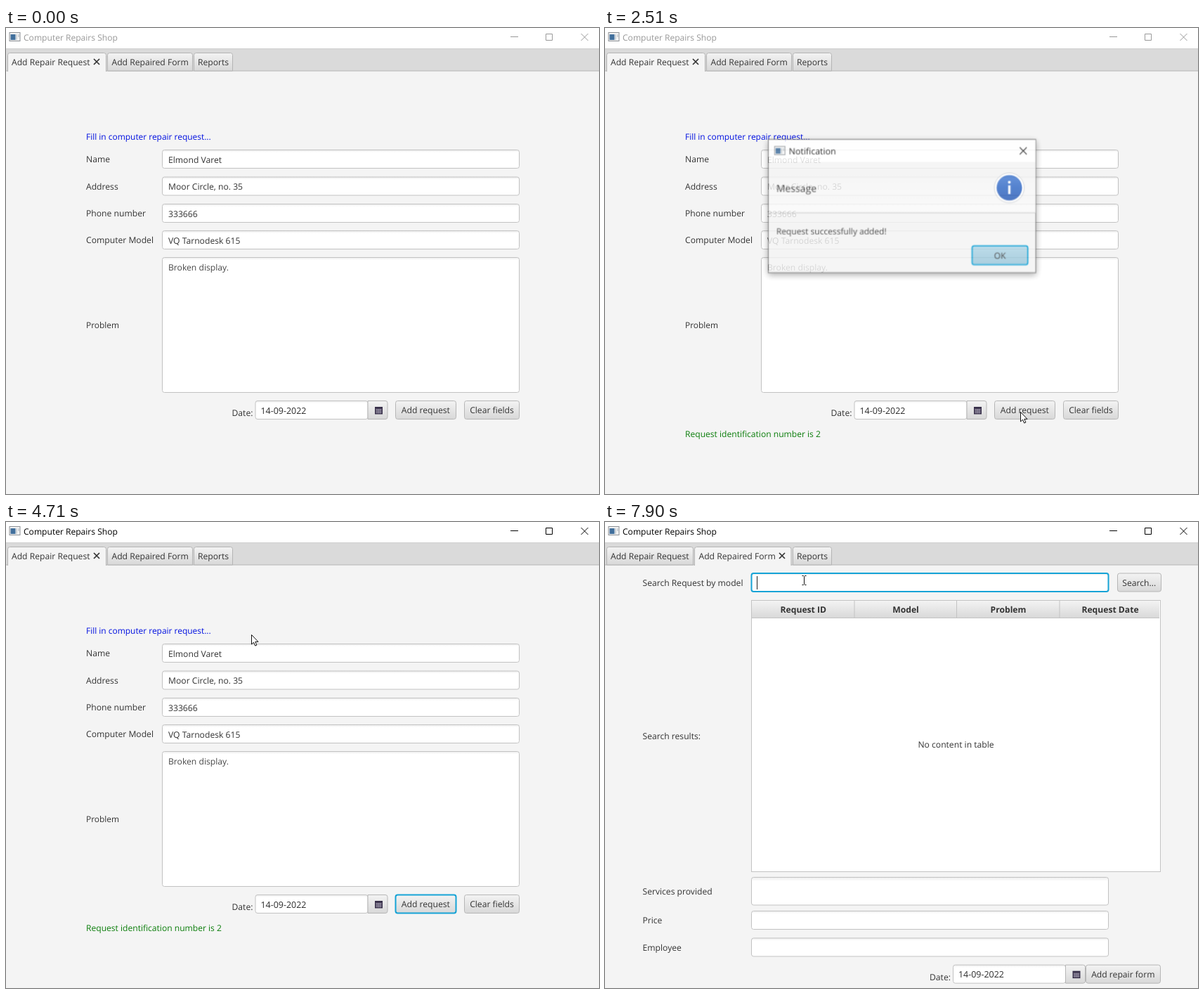
Recreate the animation shown at these times as an HTML page. Size 844 by 663 pixels, loop 8000 ms.

```html
<!DOCTYPE html>
<html lang="en">
<head>
<meta charset="utf-8">
<title>Computer Repairs Shop</title>
<style>
html, body { margin: 0; width: 100%; height: 100%; overflow: hidden; background: #f4f4f4; }
svg { display: block; width: 100vw; height: 100vh; }
text { font: 12.15px "Open Sans", "Noto Sans", sans-serif; fill: #333; text-rendering: geometricPrecision; white-space: pre; }
.mid { text-anchor: middle; }
.bold { font-weight: 700; }
.value { fill: #2b2b2b; }
.date { font-size: 12.45px; }
.input, .area { fill: url(#inset); stroke: #c2c2c2; rx: 3px; }
.area { fill: url(#insetTall); }
.button { fill: url(#raised); stroke: #b6b6b6; rx: 3px; }
.tab { fill: url(#raised); stroke: #b4b4b4; }
.open { fill: #f4f4f4; stroke: #b4b4b4; }
.ring { fill: none; stroke: #16a3d6; stroke-width: 2; rx: 3px; }
.cross { fill: none; stroke: #333; stroke-width: 1.7; }
.thin { fill: none; stroke: currentColor; }
.light { fill: #fff; fill-opacity: .38; rx: 3px; }
.dark { fill: #000; fill-opacity: .08; rx: 3px; }

/* 1% = 80 ms */
.step { animation: 8s step-end infinite; }
.active { color: #999; animation-name: active; }
.active text { fill: currentColor; font-size: 12.07px; }
.page1 { animation-name: page1; }
.page2 { animation-name: page2; }
.addHover { animation-name: addHover; }
.addPress { animation-name: addPress; }
.addFocus { animation-name: addFocus; }
.message { animation-name: message; }
.okHover { animation-name: okHover; }
.okPress { animation-name: okPress; }
.tabHover { animation-name: tabHover; }
.tabFocus { animation-name: tabFocus; }
.fieldFocus { animation-name: fieldFocus; }
.caret { animation-name: caret; }
.shown { animation-name: shown; }
.spot { animation-name: spot; }
.arrow { animation-name: arrow; }
.beam { animation-name: beam; }
.dialog { transform-origin: 423px 253px; animation: dialog 8s linear infinite; }
.frame { filter: drop-shadow(0 3px 5px rgba(0,0,0,.38)); }
.pointer { animation: move 8s linear infinite; }

@keyframes active { 0%, 30% { color: #999; } 25.5%, 48.75% { color: #000; } }
@keyframes page1 { 0% { opacity: 1; } 72.25% { opacity: 0; } }
@keyframes page2 { 0% { opacity: 0; } 72.25% { opacity: 1; } }
@keyframes addHover { 0%, 25.5%, 30% { opacity: 0; } 15.4%, 27.625% { opacity: 1; } }
@keyframes addPress { 0%, 27.625% { opacity: 0; } 25.5% { opacity: 1; } }
@keyframes addFocus { 0%, 30% { opacity: 0; } 25.5%, 48.75% { opacity: 1; } }
@keyframes message { 0% { opacity: 0; } 28.25% { opacity: 1; } }
@keyframes okHover { 0%, 46.875% { opacity: 0; } 39.8% { opacity: 1; } }
@keyframes okPress { 0%, 48.75% { opacity: 0; } 46.875% { opacity: 1; } }
@keyframes tabHover { 0% { opacity: 0; } 63% { opacity: 1; } }
@keyframes tabFocus { 0% { opacity: 1; } 84.875% { opacity: 0; } }
@keyframes fieldFocus { 0% { opacity: 0; } 84.875% { opacity: 1; } }
@keyframes caret { 0%, 92.375% { opacity: 0; } 84.875%, 98.75% { opacity: 1; } }
@keyframes shown { 0% { opacity: 0; } 7.875% { opacity: 1; } }
@keyframes spot {
  0%, 27.625%, 48.75%, 74%, 86% { opacity: 0; }
  25.5%, 46.875%, 71.625%, 84.875% { opacity: 1; }
}
@keyframes arrow { 0% { opacity: 1; } 80.6% { opacity: 0; } }
@keyframes beam { 0% { opacity: 0; } 80.6% { opacity: 1; } }
@keyframes dialog {
  0%, 30% { opacity: 0; transform: scale(.96); }
  31.375%, 32.2% { opacity: .84; transform: scale(.99); }
  32.25%, 48.74% { opacity: 1; transform: none; }
  48.75%, 100% { opacity: 0; transform: none; }
}
@keyframes move {
  0%, 7.875% { transform: translate(776px, 655px); }
  10.5% { transform: translate(712px, 566px); }
  13.1% { transform: translate(640px, 513px); }
  15.6% { transform: translate(598px, 536px); }
  17.5%, 32.5% { transform: translate(591px, 546px); }
  35% { transform: translate(610px, 440px); }
  37.25% { transform: translate(617px, 358px); }
  39.8% { transform: translate(592px, 334px); }
  42%, 51% { transform: translate(569px, 321px); }
  53.4% { transform: translate(640px, 406px); }
  55.2% { transform: translate(560px, 345px); }
  58.875%, 59.4% { transform: translate(349px, 160px); }
  61.375% { transform: translate(278px, 83px); }
  63.5%, 65.6% { transform: translate(186px, 37px); }
  67.25%, 76.2% { transform: translate(196px, 47px); }
  79% { transform: translate(246px, 64px); }
  81.75%, 100% { transform: translate(283px, 83px); }
}
</style>
</head>
<body>
<svg viewBox="0 0 844 663" preserveAspectRatio="none">
  <defs>
    <linearGradient id="raised" x2="0" y2="1"><stop stop-color="#f3f3f3"/><stop offset="1" stop-color="#d8d8d8"/></linearGradient>
    <linearGradient id="blue" x2="0" y2="1"><stop stop-color="#b3d8e8"/><stop offset="1" stop-color="#9cc7da"/></linearGradient>
    <linearGradient id="inset" x2="0" y2="1"><stop stop-color="#ececec"/><stop offset=".14" stop-color="#fff"/></linearGradient>
    <linearGradient id="insetTall" x2="0" y2="1"><stop stop-color="#ececec"/><stop offset=".02" stop-color="#fff"/></linearGradient>
    <linearGradient id="head" x2="0" y2="1"><stop stop-color="#f3f3f3"/><stop offset="1" stop-color="#fafafa"/></linearGradient>
    <linearGradient id="info" x2="0" y2="1"><stop stop-color="#4c80d4"/><stop offset=".5" stop-color="#356bc6"/><stop offset="1" stop-color="#2f60b8"/></linearGradient>
    <g id="icon">
      <rect x=".5" y=".5" width="15" height="12" fill="#f4f4f4" stroke="#8b8f94"/>
      <rect x="2" y="3" width="7" height="8" fill="#416f9c"/>
      <path d="M10.5 3v8M13.5 3v4" stroke="#a9b4be"/>
    </g>
    <path id="x" class="cross" d="M-4-4 4 4M4-4-4 4"/>
    <g id="calendar">
      <path fill="#38304a" d="M0 0h11v10.5H0z"/>
      <path stroke="#b9b4c4" stroke-width=".7" d="M1 3.5h9M1 5.7h9M1 7.9h9M3.2 3v6.5M5.5 3v6.5M7.8 3v6.5"/>
    </g>
    <g id="picker">
      <rect class="input" x=".5" y=".5" width="160" height="26"/>
      <path d="M160.5.5h25a3 3 0 0 1 3 3v20a3 3 0 0 1-3 3h-25z" fill="url(#raised)" stroke="#b6b6b6"/>
      <use href="#calendar" x="170.5" y="9"/>
      <text class="value date" x="8" y="18.7">14-09-2022</text>
    </g>
    <g id="field"><rect class="input" x=".5" y=".5" width="508" height="26"/></g>
  </defs>

  <rect width="844" height="663" fill="#f4f4f4"/>
  <rect width="844" height="29" fill="#fff"/>
  <rect y="29" width="844" height="32" fill="#dadada"/>
  <path d="M0 29.5h844" stroke="#cfcfcf"/>
  <path d="M0 61h844" stroke="#b4b4b4"/>
  <use href="#icon" x="4.5" y="6"/>
  <g class="step active">
    <text x="25" y="18">Computer Repairs Shop</text>
    <path class="thin" d="M718 12.5h11M768.5 8.5h9v9h-9zM818.5 8l10 10M828.5 8l-10 10"/>
  </g>

  <g class="step page1">
    <path class="open" d="M2.5 62V38.500q0-3 3-3h134q3 0 3 3V62"/>
    <path class="tab" d="M144.500 61V38.500q0-3 3-3h115q3 0 3 3V61z"/>
    <rect class="step tabHover light" x="146" y="37" width="119" height="23"/>
    <text x="8" y="52.700">Add Repair Request</text>
    <use href="#x" x="129" y="48"/>
    <text x="150.500" y="52.700">Add Repaired Form</text>

    <text x="114" y="158.500" style="fill:#0010e0;font-size:11.95px">Fill in computer repair request...</text>
    <text x="114" y="191">Name</text>
    <text x="114" y="229.500">Address</text>
    <text x="114" y="267.700">Phone number</text>
    <text x="114" y="306">Computer Model</text>
    <text x="114" y="427" style="font-size:11.9px">Problem</text>
    <use href="#field" x="222" y="173"/>
    <use href="#field" x="222" y="211.500"/>
    <use href="#field" x="222" y="250"/>
    <use href="#field" x="222" y="288"/>
    <rect class="area" x="222.500" y="326.500" width="508" height="192"/>
    <g class="value">
      <text x="231" y="192">Elmond Varet</text>
      <text x="231" y="230.300">Moor Circle, no. 35</text>
      <text x="231" y="268.700">333666</text>
      <text x="231" y="307">VQ Tarnodesk 615</text>
      <text x="231" y="344.500" style="fill:#484848">Broken display.</text>
    </g>

    <text x="321.500" y="552">Date:</text>
    <use href="#picker" x="354.500" y="530"/>
    <rect class="button" x="554.500" y="530.500" width="86" height="26"/>
    <rect class="step addHover light" x="555" y="531" width="85" height="25"/>
    <rect class="step addPress dark" x="555" y="531" width="85" height="25"/>
    <rect class="step addFocus ring" x="554.500" y="530.500" width="86" height="26"/>
    <text class="mid" x="597.300" y="548.300">Add request</text>
    <rect class="button" x="652.500" y="530.500" width="78" height="26"/>
    <text class="mid" x="691.500" y="548.300">Clear fields</text>
    <text class="step message" x="114" y="582" style="fill:#0a7d0a;font-size:12.08px">Request identification number is 2</text>
  </g>

  <g class="step page2">
    <path class="tab" d="M2.500 61V38.500q0-3 3-3h117q3 0 3 3V61z"/>
    <path class="open" d="M127.500 62V38.500q0-3 3-3h131.500q3 0 3 3V62"/>
    <path class="step tabFocus ring" d="M128 61V38.500q0-2.500 2.500-2.500h132q2.500 0 2.500 2.500V61"/>
    <text x="8" y="52.700">Add Repair Request</text>
    <text x="133.500" y="52.700">Add Repaired Form</text>
    <use href="#x" x="252" y="48"/>

    <text x="53.500" y="90.500">Search Request by model</text>
    <text x="53.500" y="308.500">Search results:</text>
    <text x="53.500" y="530">Services provided</text>
    <text x="53.500" y="571">Price</text>
    <text x="53.500" y="609.500">Employee</text>
    <use href="#field" x="208" y="72.500"/>
    <rect class="step fieldFocus ring" x="208.500" y="73" width="508" height="26"/>
    <path class="step caret" d="M216.500 77v19" stroke="#222"/>
    <rect class="button" x="729.500" y="73" width="62" height="26"/>
    <text class="mid" x="760.300" y="90.500">Search...</text>

    <rect x="208.500" y="111.500" width="582" height="386" fill="#fff" stroke="#c3c3c3"/>
    <rect x="209" y="112" width="580" height="25" fill="url(#raised)"/>
    <path d="M209 136.500h580M355 112v25M500.500 112v25M647 112v25" stroke="#c3c3c3"/>
    <g class="bold">
      <text class="mid bold" x="282.300" y="129">Request ID</text>
      <text class="mid bold" x="428" y="129">Model</text>
      <text class="mid bold" x="574" y="129">Problem</text>
      <text class="mid bold" x="719" y="129">Request Date</text>
    </g>
    <text class="mid" x="499.500" y="321.300">No content in table</text>

    <rect class="input" x="208.500" y="505.500" width="508" height="39.500"/>
    <use href="#field" x="208" y="553"/>
    <use href="#field" x="208" y="591.500"/>
    <text x="462" y="651.500">Date:</text>
    <use href="#picker" x="495" y="629.700"/>
    <rect class="button" x="684.500" y="630.200" width="106" height="26"/>
    <text class="mid" x="737.300" y="648">Add repair form</text>
  </g>

  <path class="tab" d="M267.500 61V38.500q0-3 3-3h49q3 0 3 3V61z"/>
  <text x="273" y="52.700">Reports</text>

  <g class="dialog">
    <rect class="frame" x="230.500" y="157.500" width="384.500" height="191.500" fill="#f4f4f4" stroke="#666"/>
    <rect x="231" y="158" width="383.500" height="32" fill="#fff"/>
    <rect x="231" y="190" width="383.500" height="73" fill="url(#head)"/>
    <path d="M231 263h383.500" stroke="#bdbdbd"/>
    <use href="#icon" x="239" y="167"/>
    <text x="260" y="179" style="fill:#111;font-size:12.5px">Notification</text>
    <path d="M592 169l10 10M602 169l-10 10" stroke="#222" stroke-width="1.1"/>
    <text x="242" y="233" style="font-size:14.2px">Message</text>
    <circle cx="577" cy="227" r="21.500" fill="#fff" stroke="#cfd2d6"/>
    <circle cx="577" cy="227" r="18.300" fill="url(#info)"/>
    <circle cx="577" cy="219" r="2" fill="#fff"/>
    <path d="M577 223.500v12.500" stroke="#fff" stroke-width="3.200"/>
    <text x="242" y="294">Request successfully added!</text>
    <rect x="523.500" y="310.500" width="80" height="27" rx="3" fill="url(#blue)"/>
    <rect class="step okHover light" x="524" y="311" width="79" height="26"/>
    <rect class="step okPress dark" x="524" y="311" width="79" height="26"/>
    <rect class="ring" x="523.500" y="310.500" width="80" height="27"/>
    <text class="mid" x="563.500" y="328.500">OK</text>
  </g>

  <g class="step shown">
    <g class="pointer">
      <circle class="step spot" r="13" fill="#f4e736" fill-opacity=".72"/>
      <path class="step arrow" d="M.5.500V14l3-2.800 2.200 4.900 2.200-1-2.100-4.700H10z" fill="#fff" stroke="#111"/>
      <path class="step beam" d="M-2.500-6.500h2l1 1 1-1h2M.500-5.500v11M-2.500 6.500h2l1-1 1 1h2" fill="none" stroke="#111"/>
    </g>
  </g>
</svg>
</body>
</html>
```
